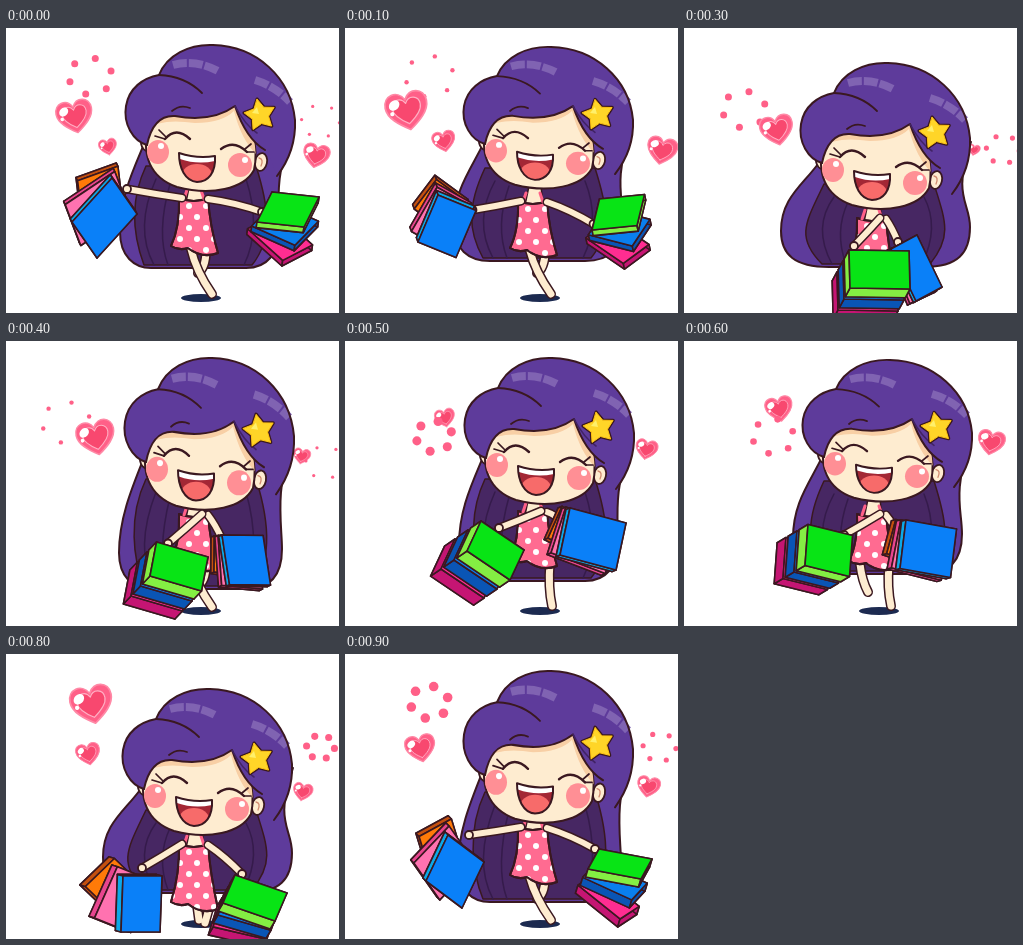
These frames come from a looping animation (333 px wide and 285 px high, 1 s). An HTML page with a canvas:

```html
<!DOCTYPE html>
<html>
<head>
<meta charset="utf-8">
<style>
html, body { margin: 0; width: 100%; height: 100%; overflow: hidden; background: #fff; }
canvas { display: block; }
</style>
</head>
<body>
<canvas id="stage" width="333" height="285"></canvas>
<script>
const ctx = document.getElementById('stage').getContext('2d');
const INK = '#3a1820', HAIR = '#5e3b9b', DARK = '#472763', SKIN = '#feecd0';
const PINK = '#ff6088';

// Body poses, repeated every half loop
const BODY = [
  { top: 16, sy: 1, dx: 1, left: 114, right: 273, base: 240, neck: 169, hem: 223 },
  { top: 18, sy: .97, dx: 0, left: 109, right: 278, base: 233, neck: 172, hem: 225 },
  { top: 22, sy: .94, dx: 1, left: 105, right: 283, base: 227, neck: 175, hem: 227 },
  { top: 34, sy: 1, dx: -2, left: 97, right: 286, base: 239, neck: 189, hem: 253 },
  { top: 16, sy: 1.04, dx: 0, left: 113, right: 276, base: 248, neck: 172, hem: 226 }
];

// Key poses by step: corner, handle edge, side edge, stack shift, fan angle
const COOL = {
  0: [106, 150, 25, 36, -40, 44, -2, -4, 14],
  2: [80, 184, 51, -5, 0, 50, -2, -7, 0],
  3: [207, 221, 26, -14, 25, 52, -3, 2, 3],
  5: [225, 167, 56, 15, -10, 47, -5, 2, 6],
  7: [219, 191, 45, 3, -2, 50, -6, 1, 2],
  8: [117, 222, 39, 0, -2, 56, -7, -2, 22],
  9: [103, 181, 36, 27, -22, 46, -4, -4, 18]
};
const WARM = {
  0: [266, 164, -15, 30, 47, 5, -1, 7, 18],
  2: [243, 178, 0, 32, 43, -14, 4, 7, 22],
  3: [165, 222, 60, 1, 1, 38, -6, 11, 0],
  5: [136, 180, 43, 29, -14, 30, -13, 9, 0],
  7: [112, 187, 46, -7, 8, 52, -9, 4, 0],
  8: [229, 221, 52, 18, -12, 28, -6, 10, -3],
  9: [254, 195, -11, 20, 53, 10, -3, 10, 14]
};
// Left hand, right hand
const HANDS = {
  0: [121, 161, 256, 184], 2: [134, 203, 241, 208],
  3: [170, 218, 214, 214], 5: [154, 187, 218, 182],
  7: [166, 201, 213, 210], 8: [136, 214, 236, 220], 9: [124, 181, 250, 195]
};
const COOL_COLORS = [['#0a80f8', '#0ba9e8'], ['#ff72b0', '#e8458f'], ['#ff7a08', '#c4500f']];
const WARM_COLORS = [['#08e415', '#84ee43'], ['#0a7fee', '#0a55b5'], ['#ff2d91', '#c51573']];

const HEARTS = [
  { born: 5, x: 100, y: 77, dx: -4.7, dy: -8.7, size: 20, grow: 7.3, life: 4, ring: 19 },
  { born: 7, x: 89, y: 106, dx: -6.7, dy: -5.7, size: 18, grow: 6, life: 5, ring: 19 },
  { born: 0, x: 102, y: 119, dx: -3, dy: -5.5, size: 18, grow: 5, life: 5, ring: 18 },
  { born: 3, x: 290, y: 122, dx: 5.7, dy: -6.7, size: 12, grow: 5, life: 5, ring: 14 },
  { born: 7, x: 290, y: 143, dx: 6.7, dy: -5, size: 16, grow: 3.5, life: 5, ring: 14 }
];

function poseAt(keys, step) {
  return keys[step] || keys[step - 1].map((v, i) => (v + keys[step + 1][i]) / 2);
}

function shape(d, fill, stroke, width = 2) {
  const p = new Path2D(d);
  if (fill) { ctx.fillStyle = fill; ctx.fill(p); }
  if (stroke) { ctx.strokeStyle = stroke; ctx.lineWidth = width; ctx.stroke(p); }
}

function oval(x, y, rx, ry, fill, stroke, tilt = 0) {
  ctx.beginPath();
  ctx.ellipse(x, y, rx, ry, tilt, 0, Math.PI * 2);
  ctx.fillStyle = fill;
  ctx.fill();
  if (stroke) { ctx.strokeStyle = stroke; ctx.lineWidth = 1.8; ctx.stroke(); }
}

function limb(d, width = 7) {
  shape(d, null, INK, width + 3);
  shape(d, null, SKIN, width);
}

function poly(points, fill) {
  shape('M' + points.map(p => p.join(' ')).join('L') + 'Z', fill, INK, 1.6);
}

function heart(x, y, size, tilt) {
  ctx.save();
  ctx.translate(x, y);
  ctx.rotate(tilt);
  ctx.scale(size / 36, size / 36);
  const d = 'M0 16C-9 10-18 3-18-6C-18-17-5-20 0-10C5-20 18-17 18-6C18 3 9 10 0 16Z';
  shape(d, PINK, '#ff89a6', 1.5);
  ctx.save();
  ctx.scale(.68, .68);
  shape(d, '#f8486f', '#ffb0c4', 1.5);
  ctx.restore();
  oval(-10, -7, 5, 4, '#fff', null, -.6);
  oval(-13, 0, 1.8, 1.8, '#fff');
  ctx.restore();
}

function drawHearts(step) {
  for (const h of HEARTS) {
    const age = (step - h.born + 10) % 10;
    const tilt = h.dx < 0 ? -.2 : .2;
    if (age < h.life) {
      heart(h.x + h.dx * age, h.y + h.dy * age, h.size + h.grow * age, tilt);
      continue;
    }
    const k = age - h.life;
    if (k > 2) continue;
    const at = h.life - .7, r = h.ring + 2.5 * k;
    for (let i = 0; i < 6; i++) {
      const a = i * Math.PI / 3 - .1 + tilt;
      oval(h.x + h.dx * at + r * Math.cos(a), h.y + h.dy * at + r * .85 * Math.sin(a),
        (4.8 - 1.3 * k) * h.ring / 19, (4.8 - 1.3 * k) * h.ring / 19, PINK);
    }
  }
}

function drawBackHair(b) {
  const { left: l, right: r, base: y, top } = b, s = top + 80;
  shape(`M146 ${s}C132 ${s + 38} ${l} ${y - 78} ${l} ${y - 36}C${l} ${y - 12} ${l + 14} ${y} 145 ${y}
    L240 ${y}C${r - 12} ${y} ${r} ${y - 14} ${r} ${y - 40}C${r} ${y - 65} 268 ${s + 55} 287 ${s}Z`, HAIR, INK);
  shape(`M140 ${s + 42}C122 ${s + 80} ${l + 14} ${y - 30} 138 ${y - 3}L246 ${y - 3}
    C268 ${y - 30} 262 ${s + 80} 250 ${s + 42}Z`, DARK, INK, 1.5);
  shape(`M150 ${s + 55}Q128 ${y - 40} 148 ${y - 3}M164 ${s + 60}Q150 ${y - 35} 162 ${y - 3}
    M240 ${s + 55}Q256 ${y - 40} 238 ${y - 3}`, null, '#351b4b', 1.5);
}

function drawLegs(step, b) {
  const y = b.hem - 2;
  if (step % 5 === 3) {
    limb(`M191 ${y}L193 266M204 ${y}L199 269`);
  } else if (step >= 5 && step < 8) {
    if (step > 5) limb(`M176 ${y}Q178 240 184 251`);
    limb(`M205 ${y}Q203 247 207 265`);
  } else {
    limb(`M200 ${y}Q200 240 192 245`);
    limb(`M185 ${y}Q190 243 206 266`);
  }
}

function drawBody(step, b) {
  const n = b.neck, h = b.hem;
  drawLegs(step, b);
  shape(`M184 ${n - 14}L180 ${n + 5}L198 ${n + 5}L196 ${n - 14}Z`, SKIN, INK, 1.5);
  const dress = `M173 ${n + 1}Q188 ${n + 7} 202 ${n + 1}Q204 ${n + 30} 212 ${h + 2}Q196 ${h + 8} 182 ${h - 3}
    Q173 ${h} 165 ${h - 5}Q174 ${n + 30} 173 ${n + 1}Z`;
  shape(dress, '#ff6b91', INK);
  ctx.save();
  ctx.clip(new Path2D(dress));
  for (let row = 0; row < 6; row++)
    for (let col = 0; col < 4; col++)
      oval(166 + col * 17 + row % 2 * 8, n + 9 + row * 11, 3, 3, '#fff');
  ctx.restore();
  shape(dress, null, INK);
  shape(`M178 ${n + 2}L181 ${n - 7}M198 ${n + 2}L195 ${n - 7}`, null, PINK, 3);
}

function drawArms(step, b) {
  const [lx, ly, rx, ry] = poseAt(HANDS, step), n = b.neck;
  const from = step > 2 && step < 8 ? 196 : 176;
  limb(`M202 ${n + 2}Q${(202 + rx) / 2} ${(n + ry) / 2 - 2} ${rx} ${ry}`, 6);
  limb(`M${from} ${n + 1}Q${(from + lx) / 2} ${(n + ly) / 2 + 1} ${lx} ${ly}`, 6);
  oval(lx, ly, 4, 4, SKIN, INK);
  oval(rx, ry, 4, 4, SKIN, INK);
}

function star(x, y, r) {
  let d = '';
  for (let i = 0; i < 10; i++) {
    const a = i * Math.PI / 5 - 1.75, q = i % 2 ? r * .54 : r;
    d += (i ? 'L' : 'M') + (x + q * Math.cos(a)) + ' ' + (y + q * Math.sin(a));
  }
  shape(d + 'Z', '#ffd528', INK, 3.5);
  shape(d + 'Z', '#ffd528', '#ffc313', 1);
  shape(`M${x - 3} ${y - 8}L${x - 1} ${y - 1}L${x - 8} ${y - 2}`, '#fff06b');
}

function drawFace() {
  oval(139, 115, 5, 8, SKIN, INK, -.2);
  oval(254, 134, 6, 9, SKIN, INK, .2);
  shape('M252 130Q257 131 254 138', null, '#d18a70', 1.3);
  const face = 'M142 94C133 128 144 150 170 159C204 168 237 161 247 142C252 120 245 95 230 76L160 82Z';
  shape(face, SKIN, INK);
  ctx.save();
  ctx.clip(new Path2D(face));
  shape('M140 101Q154 90 188 95Q215 95 227 83Q234 111 249 126L246 76L145 76Z', '#f8cfa5');
  oval(151, 124, 11, 12, '#ff8f95');
  oval(233, 137, 12, 12, '#ff8f95');
  ctx.restore();
  oval(154, 118, 3, 3, '#fff');
  oval(238, 132, 3, 3, '#fff');
  shape('M158 111Q169 98 183 111M214 121Q227 111 240 124', null, INK, 2.4);
  shape('M158 111L148 108M159 109L152 102M240 124L247 124M238 121L244 116', null, INK, 1.7);
  const mouth = 'M172 125Q190 131 208 128C209 145 201 154 190 154C178 153 172 140 172 125Z';
  shape(mouth, '#a32735');
  ctx.save();
  ctx.clip(new Path2D(mouth));
  oval(190, 147, 15, 11, '#f76b6a');
  shape('M172 123L209 126L208 133Q190 137 173 131Z', '#fff');
  ctx.restore();
  shape(mouth, null, INK);
}

function drawFrontHair() {
  const outer = 'M140 117C126 113 116 96 119 78C122 60 136 50 152 47C160 27 182 16 206 17' +
    'C250 18 284 50 288 92C289 116 280 135 270 148';
  const inner = 'C266 140 264 126 258 122C244 114 234 96 228 78C210 91 190 92 168 88C152 87 144 98 140 117';
  shape(outer + inner + 'Z', HAIR);
  ctx.lineCap = 'butt';
  ctx.setLineDash([14, 2]);
  shape('M166 37Q188 31 211 43M248 52Q268 58 283 74', null, '#8063b2', 8);
  ctx.setLineDash([]);
  ctx.lineCap = 'round';
  shape(outer, null, INK);
  shape('M258 122C244 114 234 96 228 78C210 91 190 92 168 88C152 87 144 98 140 117', null, INK);
  shape('M152 47Q178 48 195 65M165 83Q173 76 183 80', null, INK, 1.8);
  shape('M228 78Q238 97 250 105', null, '#412365', 1.6);
  star(253, 87, 16);
}

function drawHead(b) {
  ctx.save();
  ctx.translate(b.dx, b.top - 16 * b.sy);
  ctx.scale(1, b.sy);
  drawFace();
  drawFrontHair();
  ctx.restore();
}

function drawBag(pose, k, [front, side]) {
  const [x, y, ux, uy, vx, vy, sx, sy, fan] = pose;
  const a = k * fan * Math.PI / 180, c = Math.cos(a), s = Math.sin(a);
  const len = front === '#ff7a08' ? .72 : 1;
  const mx = x + ux / 2 + sx * k, my = y + uy / 2 + sy * k;
  const at = (p, q, shift = 0) => {
    const dx = ux * (p - .5) + vx * q * len, dy = uy * (p - .5) + vy * q * len;
    return [mx + dx * c - dy * s + sx * shift, my + dx * s + dy * c + sy * shift];
  };
  const rim = [[0, 0], [1, 0], [1, 1], [0, 1]];
  poly(rim.map(([p, q]) => at(p, q, .8)), side);
  rim.forEach(([p, q], i) => {
    const [p2, q2] = rim[(i + 1) % 4];
    poly([at(p, q), at(p2, q2), at(p2, q2, .8), at(p, q, .8)], side);
  });
  poly(rim.map(([p, q]) => at(p, q)), front);
}

function drawBags(keys, colors, step) {
  const pose = poseAt(keys, step);
  for (let k = 2; k >= 0; k--) drawBag(pose, k, colors[k]);
}

function draw(step) {
  const b = BODY[step % 5];
  ctx.fillStyle = '#fff';
  ctx.fillRect(0, 0, 333, 285);
  ctx.lineCap = ctx.lineJoin = 'round';
  drawHearts(step);
  oval(195, 270, 20, 4, '#1c2a50');
  drawBackHair(b);
  drawBody(step, b);
  drawHead(b);
  drawArms(step, b);
  drawBags(COOL, COOL_COLORS, step);
  drawBags(WARM, WARM_COLORS, step);
}

const start = performance.now();
function tick() {
  draw(Math.floor((performance.now() - start) % 1000 / 100));
  requestAnimationFrame(tick);
}
tick();
</script>
</body>
</html>
```
